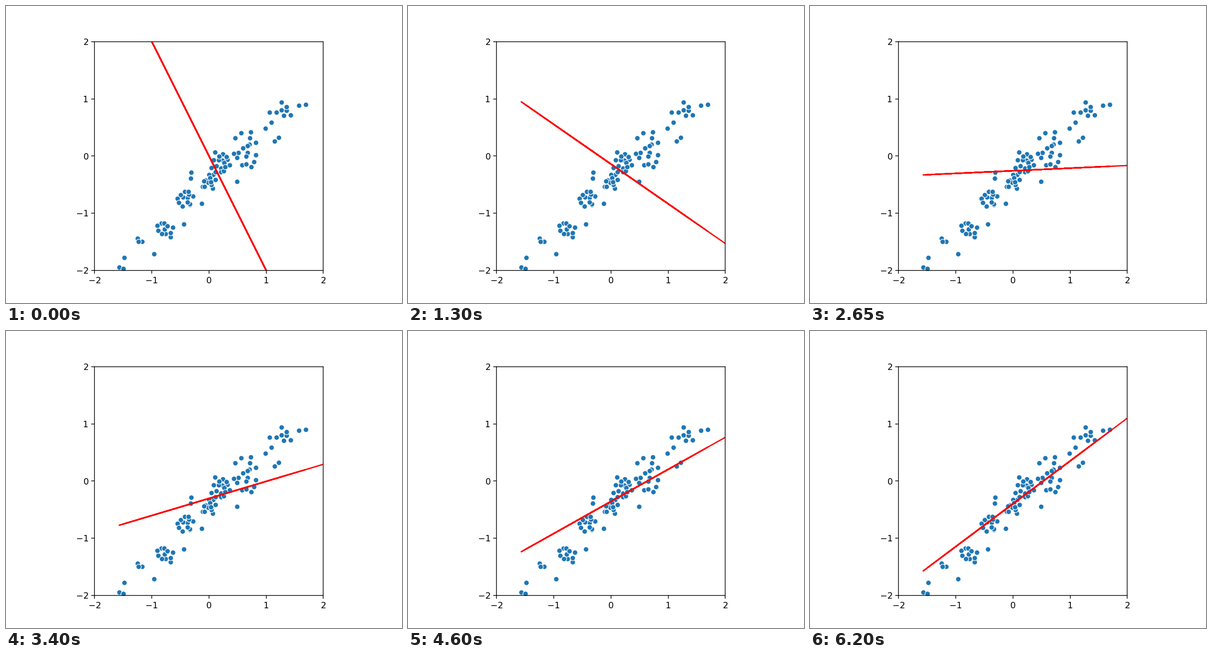
A matplotlib script that plays this animation: 864x648 px, repeating every 6.25 s.

```python
import matplotlib.pyplot as plt
import numpy as np
from matplotlib.animation import FuncAnimation

FRAMES, INTERVAL = 125, 50
GOLDEN = np.pi * (3 - np.sqrt(5))
rng = np.random.default_rng(3)


def cloud(x, y, n, radius):
    """n dots spread over a disc, with a little jitter."""
    k = np.arange(n)
    r = radius * np.sqrt((k + .5) / n)
    disc = np.column_stack([x + r * np.cos(k * GOLDEN),
                            y + r * np.sin(k * GOLDEN)])
    return disc + rng.normal(0, .02, disc.shape)


def samples():
    """Clouds along the trend, and the dots that stand apart from them."""
    clouds = [
        cloud(-1.23, -1.45, 3, .05),
        cloud(-.77, -1.28, 11, .15),
        cloud(-.40, -.75, 13, .16),
        cloud(.01, -.44, 13, .13),
        cloud(.20, -.13, 17, .19),
        cloud(.62, -.02, 12, .22),
        cloud(.65, .33, 6, .19),
        cloud(1.31, .79, 7, .14),
    ]
    apart = [(-1.57, -1.95), (-1.50, -1.97), (-1.48, -1.78), (-.96, -1.71),
             (-.44, -1.19), (-.13, -.83), (-.32, -.39), (-.31, -.29),
             (.49, -.45), (.99, .48), (1.06, .76), (1.09, .59), (1.15, .26),
             (1.22, .32), (1.57, .88), (1.69, .90)]
    return rng.permutation(np.vstack([*clouds, apart])).T


def descend(rate=.04, mean_x=.105, mean_xx=.579):
    """Gradient descent on the squared error, one step per frame."""
    hessian = np.array([[mean_xx, mean_x], [mean_x, 1]])
    best = np.array([.927, -.439])
    theta = np.array([-2., 0.])
    steps = []
    for _ in range(FRAMES):
        steps.append(theta)
        theta = theta - rate * hessian @ (theta - best)
    return steps


fig, ax = plt.subplots(figsize=(6.4, 4.8), dpi=135)
ax.set_aspect("equal")
ax.set(xlim=(-2, 2), ylim=(-2, 2), xticks=range(-2, 3), yticks=range(-2, 3))

x, y = samples()
ax.scatter(x, y, s=36, color="tab:blue", edgecolor="white", linewidth=.7)

# The fit is traced in sample order, so it runs back and forth over itself.
line_x = np.append(x, 2.2)
line, = ax.plot([], [], color="red", linewidth=1.5)
path = descend()


def update(i):
    slope, intercept = path[i]
    line.set_data(line_x, slope * line_x + intercept)
    return line,


anim = FuncAnimation(fig, update, frames=FRAMES, interval=INTERVAL,
                     repeat=True, repeat_delay=0)
plt.show()
```
